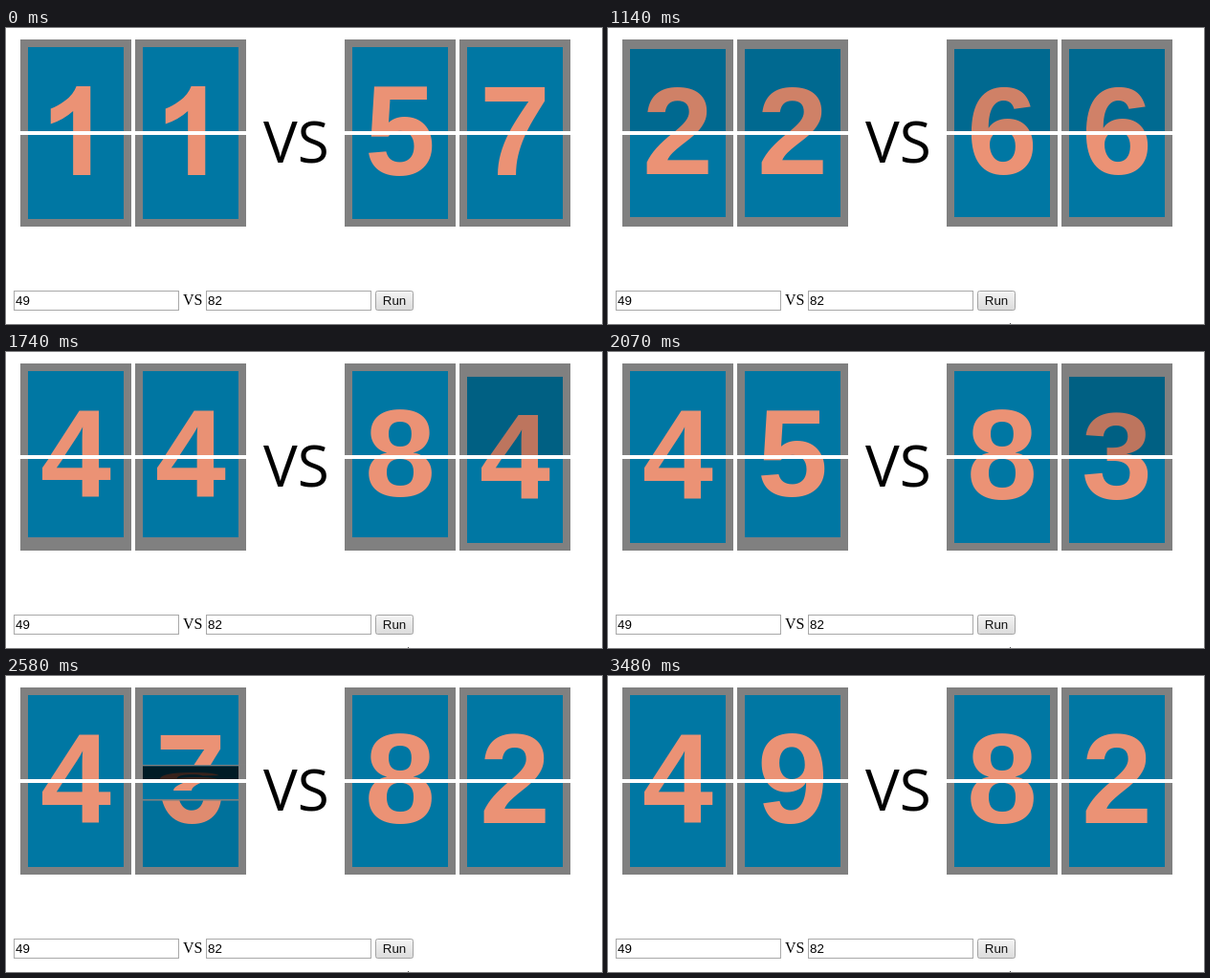
Animation of 623 by 310 pixels, one loop 3930 ms. Source, as an HTML page with a canvas:

```html
<!DOCTYPE html>
<html lang="en">
<head>
<meta charset="utf-8">
<title>Flip counter</title>
<style>
html, body { margin: 0; width: 623px; height: 310px; overflow: hidden; background: #fff; }
canvas { display: block; }
</style>
</head>
<body>
<canvas width="623" height="310"></canvas>
<script>
const ctx = document.querySelector('canvas').getContext('2d');
const LOOP = 3930;
const BASELINE = 154;
// Each flip folds one half away, then unfolds the opposite half.
const FLIP_STARTS = [785, 1115, 1409, 1739, 2075, 2410, 2740, 3070];
const PHASES = [{ delay: 0, duration: 190 }, { delay: 140, duration: 250 }];
const SANS = '"Liberation Sans", Arial, sans-serif';
const ONE = new Path2D('M806 0H525V-1059Q371 -915 162 -846V-1101Q272 -1137 401 -1237Q530 -1338 578 -1472H806Z');
const ARROW = new Path2D('M.5 .5V16.5L4.2 13L6.8 18.5L9.4 17.3L6.9 12H11.8Z');

function rect(color, x, y, w, h) {
  ctx.fillStyle = color;
  ctx.fillRect(x, y, w, h);
}

function text(str, x, y, font, color = '#000', align = 'left') {
  ctx.font = font;
  ctx.fillStyle = color;
  ctx.textAlign = align;
  ctx.fillText(str, x, y);
}

function drawDigit(digit, y) {
  const color = '#eb9275';
  if (digit !== 1) return text(digit, 58, y, `bold 133px ${SANS}`, color, 'center');
  // A "1" without a foot.
  ctx.save();
  ctx.translate(58, y);
  ctx.scale(0.0645, 0.0632);
  ctx.translate(-569, 0);
  ctx.fillStyle = color;
  ctx.fill(ONE);
  ctx.restore();
}

function drawHalf(x, top, digit, scale, shade) {
  if (scale <= 0) return;
  const hinge = top ? 108 : 112;
  const inner = [8, top ? -88 : 0, 100, 88];
  ctx.save();
  ctx.translate(x, hinge);
  ctx.scale(1, scale);
  rect('#808080', 0, top ? -96 : 0, 116, 96);
  ctx.beginPath();
  ctx.rect(...inner);
  ctx.clip();
  rect('#0077a3', ...inner);
  drawDigit(digit, BASELINE - hinge);
  if (shade > 0) rect(`rgba(0,0,0,${shade})`, ...inner);
  ctx.restore();
}

function drawCard(x, from, to, t) {
  const step = Math.sign(to - from);
  const flips = FLIP_STARTS.slice(0, Math.abs(to - from));
  PHASES.forEach(({ delay, duration }, phase) => {
    const top = (phase === 0) === (step > 0);
    const begun = flips.filter(start => start + delay <= t).length;
    if (!begun) return drawHalf(x, top, from, 1, 0);
    const progress = Math.min(1, (t - flips[begun - 1] - delay) / duration);
    const closed = phase ? progress : 1 - progress;
    const next = from + step * begun;
    const old = next - step;
    drawHalf(x, top, phase ? old : next, 1, top ? 0 : 0.4 * closed);
    drawHalf(x, top, phase ? next : old, Math.sin(closed * Math.PI / 2), top ? 0.85 * (1 - closed) : 0);
  });
}

function drawInput(x, value) {
  rect('#a9a9a9', x, 275, 173, 21);
  rect('#fff', x + 1, 276, 171, 19);
  text(value, x + 2, 290, `13.33px ${SANS}`);
}

function drawButton(hover, pressed) {
  const fill = ctx.createLinearGradient(0, 276, 0, 295);
  fill.addColorStop(0, pressed ? '#e4e4e4' : '#f4f4f4');
  fill.addColorStop(1, pressed ? '#f0f0f0' : '#dcdcdc');
  ctx.beginPath();
  ctx.roundRect(386.5, 275.5, 39, 20, 2);
  ctx.fillStyle = fill;
  ctx.fill();
  ctx.lineWidth = 1;
  ctx.strokeStyle = hover ? '#8c8c8c' : '#a3a3a3';
  ctx.stroke();
  text('Run', 406, 290, `13.33px ${SANS}`, '#111', 'center');
}

function drawCursor(t) {
  if (t < 60) return;
  const ease = (start, end) => {
    const p = Math.min(1, Math.max(0, (t - start) / (end - start)));
    return p * p * (3 - 2 * p);
  };
  const arrive = ease(60, 330), leave = ease(880, 1030);
  ctx.save();
  ctx.translate(372 + 35 * arrive + 13 * leave, 209 + 79 * arrive + 21 * leave);
  ctx.fillStyle = '#fff';
  ctx.fill(ARROW);
  ctx.strokeStyle = '#222';
  ctx.lineWidth = 1;
  ctx.stroke(ARROW);
  ctx.restore();
}

function draw(now) {
  const t = now % LOOP;
  rect('#fff', 0, 0, 623, 310);
  drawCard(15, 1, 4, t);
  drawCard(135, 1, 9, t);
  drawCard(354, 5, 8, t);
  drawCard(474, 7, 2, t);
  text('VS', 269, 140.5, '60px "Open Sans", sans-serif');
  drawInput(8, '49');
  text('VS', 185, 290, '16px "Liberation Serif", "Times New Roman", serif');
  drawInput(209, '82');
  drawButton(t > 270 && t < 940, t > 560 && t < 660);
  drawCursor(t);
}

const origin = performance.now();
function tick() {
  draw(performance.now() - origin);
  requestAnimationFrame(tick);
}
tick();
</script>
</body>
</html>
```
